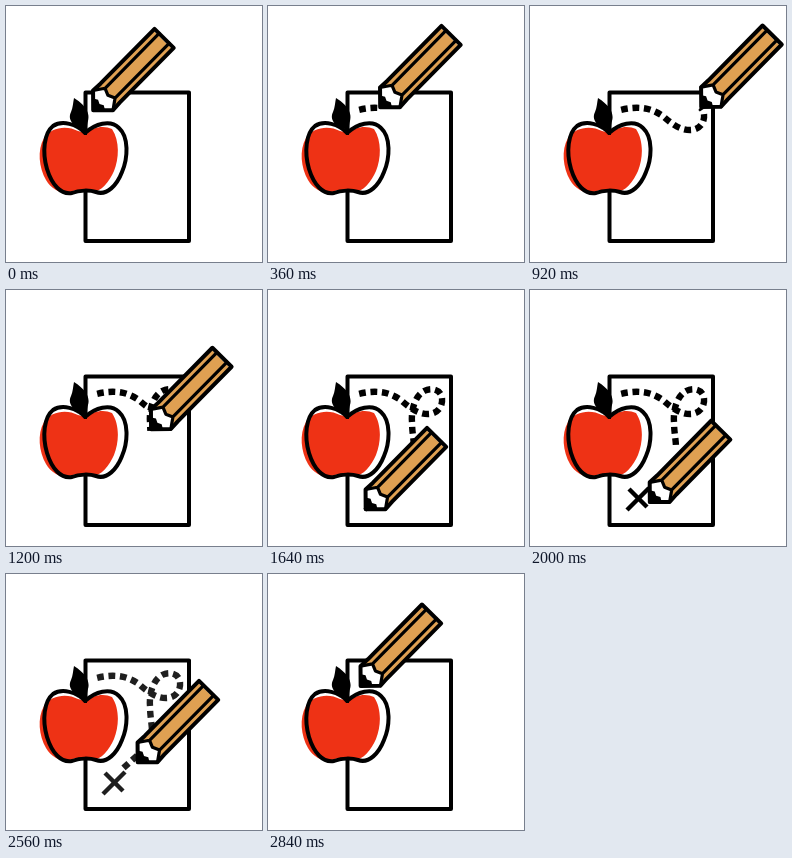
An HTML page for the animation above (2.88 s loop, 256 by 256 pixels).

```html
<!DOCTYPE html>
<html lang="en">
<head>
<meta charset="utf-8">
<title>Pencil and treasure map</title>
<style>
  html, body { margin: 0; width: 100%; height: 100%; overflow: hidden; background: #fff; }
  svg { display: block; width: 100%; height: 100%; }
  .ink { fill: none; stroke: #000; stroke-width: 4; stroke-linejoin: round; stroke-linecap: round; }
  .dashed { stroke-width: 6.4; }
  .solid { stroke-width: 4.4; }
</style>
</head>
<body>
<svg viewBox="0 0 256 256">
  <rect class="ink" x="79.5" y="86.5" width="103.5" height="148.5"/>

  <g id="apple">
    <path fill="#ee3215" d="M72 125C61 119 45 121 38 132C31 144 33 162 40 174C46 184 55 188 64 186
      C72 183 78 184 84 186C95 187 103 176 108 165C113 153 114 135 106 123C98 119 87 121 80 127Z"/>
    <path class="ink" d="M79 127C71 118 56 114 47 120C38 127 36 146 41 163C46 179 55 189 66 187
      C73 184 84 184 90 186C101 190 111 179 116 166C122 152 123 131 113 122C104 113 89 118 79 127Z"/>
    <path d="M68 92C76 97 85 105 82 115C81 119 81 122 81 129H78L77 123C68 121 61 114 65 106C67 101 67 97 68 92Z"/>
  </g>

  <g id="drawing" fill="none" stroke="#000"></g>

  <g id="pencil">
    <path fill="#fff" d="M0 0L15-14L25-13.5H102V13.5H25L15 14Z"/>
    <path fill="#dfa052" d="M15-14L25-7L22 0L25 7L15 14L25 13.5H100V-13.5H25Z"/>
    <path class="ink" d="M1 0L15-14L25-13.5H102V13.5H25L15 14Z"/>
    <path class="ink" style="stroke-width:3.2" d="M15-14L25-7L22 0L25 7L15 14M25-7H102M25 7H102"/>
    <path d="M0 0L9-9L12-4L10 0L12 4L9 9Z"/>
  </g>
</svg>
<script>
const SVG = 'http://www.w3.org/2000/svg';
const LOOP = 2880, STEP = 40, FADE_START = 2520, FADE_END = 2840;
const DASH = 6.8, GAP = 4.7;
const drawing = document.getElementById('drawing');
const pencil = document.getElementById('pencil');

// Legs of the tip's journey; legs with a line style leave ink behind.
let clock = 0;
const legs = [
  { end: 1280, power: 1.58, line: 'dashed', d: `M86.5 105C104 100 120 100 134 111C142 118 150 124 160 124
    C170 124 175 116 174 108C173 100 164 97 156 101C147 106 143 120 144 132C144 142 146 150 146 158` },
  { end: 1520, power: 1, d: 'M146 158C146 172 131 186 119 198' },
  { end: 1640, power: 1, line: 'solid', d: 'M119 198L97 220' },
  { end: 1780, power: 1, d: 'M97 220C88 222 87 204 99 199' },
  { end: 1930, power: 1, line: 'solid', d: 'M99 199L117 217' },
  { end: 2080, power: 2, d: 'M117 217C122 212 118 202 114 197' },
  { end: 2260, power: 1, line: 'dashed', d: 'M114 197L143 171' },
  { end: 2560, power: 1, d: 'M143 171C152 174 142 194 131 189' },
  { end: LOOP, power: 0.75, d: 'M131 189C120 182 105 130 87 105' }
].map(({ end, power, line, d }) => {
  const path = document.createElementNS(SVG, 'path');
  path.setAttribute('d', d);
  if (line) {
    path.setAttribute('class', line);
    drawing.append(path);
  }
  const leg = { start: clock, end, power, line, path, length: path.getTotalLength() };
  clock = end;
  return leg;
});

const progress = (t, start, end) => Math.max(0, Math.min(1, (t - start) / (end - start)));
const travelled = (leg, t) => leg.length * progress(t, leg.start, leg.end) ** leg.power;

// Dash pattern that shows only the first `length` units of a line
function dashPattern(line, length) {
  if (line === 'solid') return `${length} 999`;
  const pattern = [0, GAP];
  for (let s = GAP; s < length; s += DASH + GAP) pattern.push(Math.min(DASH, length - s), GAP);
  return [...pattern, 0, 999].join(' ');
}

function render(t) {
  const current = legs.find(leg => t < leg.end);
  const tip = current.path.getPointAtLength(travelled(current, t));
  pencil.setAttribute('transform', `translate(${tip.x} ${tip.y}) rotate(-45.4)`);

  for (const leg of legs.filter(leg => leg.line)) {
    leg.path.setAttribute('stroke-dasharray', dashPattern(leg.line, travelled(leg, t)));
  }
  drawing.setAttribute('opacity', 1 - progress(t, FADE_START, FADE_END));
}

function frame() {
  render(Math.floor(performance.now() % LOOP / STEP) * STEP);
  requestAnimationFrame(frame);
}
frame();
</script>
</body>
</html>
```
